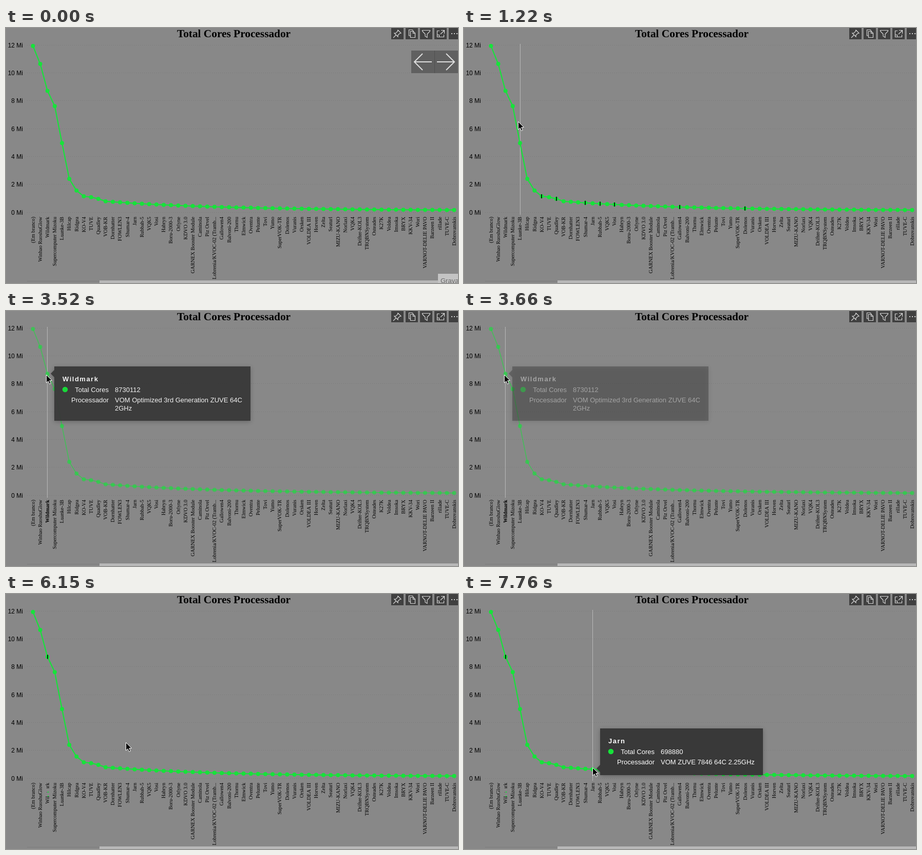
An HTML page with a canvas for the animation above (8 s loop, 880x497 px).

```html
<!DOCTYPE html>
<html lang="pt">
<head>
<meta charset="utf-8">
<title>Total Cores Processador</title>
<style>
html, body { margin: 0; width: 100%; height: 100%; overflow: hidden; background: #888; }
canvas { display: block; }
</style>
</head>
<body>
<canvas id="stage" width="880" height="497"></canvas>
<script>
const c = document.getElementById('stage').getContext('2d');
const LOOP = 8000, BG = '#888888', GREEN = '#16e33a', INK = '#06250b';
const SANS = '"Liberation Sans", Arial, sans-serif';
const SERIF = '"Liberation Serif", "Times New Roman", serif';

const names = ('(Em branco)|Winhao RuoshuGlow|Wildmark|Supercomputer Mizoku|Luanke-3B|Hilcap|Ridgea|KO-V4|TUVE|' +
  'Quadley|VOB-KR|Dornhatter|FOWLEN3|Shumar-4|Jarn|Rubbah-5|VQK5|Vosi|Habryn|Boru-2000-3|Orlyne|KDVO 3.0|' +
  'GARNEX Booster Module|Caminola|Piz Orvel|Lobrenia/KVOC-02 (Tramb...|Gallowen4|Balvoni-200|Thornu|Elmwick|' +
  'Oventra|Pelunte|Tovi|Yumo|SuperVOK-TR|Dolenos|Vuranis|Orsken|VOLDEA III|Horven|Zelta|Seaturl|MIZU-KANO|' +
  'Norlaxi|VQK4|Drifter-KOL3|TRQBNSystem|Osteades|K27K|Voldea|Imsoka|BRYX|KKV-34|Wori|VARNOT-DELIE PAVO|' +
  'Barzeen II|rillade|TUVE-C|Dobrovanskis').split('|');

// Steep start in millions of cores, then a slow exponential tail
const top10 = [11.95, 10.66, 8.73, 7.63, 4.98, 2.41, 1.57, 1.16, 1.1, 0.98];
const cores = i => i < 10 ? top10[i] : 0.14 + 0.66 * Math.exp((10 - i) / 16.5);
const px = i => 52.5 + i * 14.138;
const py = v => 359.5 - v * 27.15;
const points = names.map((_, i) => [px(i), py(cores(i))]);
const nearest = x => Math.max(0, Math.min(names.length - 1, Math.round((x - 52.5) / 14.138)));

// Pointer moves: start, end, steps, from, to, ease-out power for x and y
const moves = [
  [70, 820, 12, [890, 500], [131, 225], 2.2, 2.2],
  [820, 1630, 11, [131, 225], [78, 139], 1, 1],
  [1700, 2040, 4, [78, 134], [78, 124], 1, 1],
  [5070, 5200, 2, [79, 122], [79, 122], 1, 1],
  [5740, 6420, 11, [79, 122], [247, 333], 2.7, 1.7],
  [6560, 7100, 4, [248, 335], [250, 338], 1, 1]
];

// Progress 0..1 in n hard steps
function steps(t, a, b, n) {
  return Math.min(1, Math.floor((t - a) / (b - a) * (n - 1) + 0.1) / (n - 1));
}

const fade = (t, a, b, n) => t < a ? 0 : (steps(t, a, b, n) * (n - 1) + 1) / n;

function pointer(t) {
  const move = moves.filter(m => t >= m[0]).pop();
  if (!move) return [900, 520];
  const [a, b, n, from, to, ...power] = move;
  const left = 1 - steps(t, a, b, n);
  return to.map((v, j) => Math.round(v + (from[j] - v) * left ** power[j]));
}

function rect(x, y, w, h, fill) { c.fillStyle = fill; c.fillRect(x, y, w, h); }

function trace(pts) {
  c.beginPath();
  pts.forEach(p => c.lineTo(...p));
}

function stroke(pts, color, width) {
  trace(pts);
  c.strokeStyle = color;
  c.lineWidth = width;
  c.stroke();
}

function dot(x, y, r, fill) {
  c.beginPath();
  c.arc(x, y, r, 0, 7);
  c.fillStyle = fill;
  c.fill();
}

function text(s, x, y, font, fill, align = 'left') {
  c.font = font;
  c.fillStyle = fill;
  c.textAlign = align;
  c.fillText(s, x, y);
}

function axes(t) {
  text('Total Cores Processador', 443.5, 18, 'bold 21.33px ' + SERIF, '#000', 'center');
  c.setLineDash([1, 3]);
  for (let v = 0; v <= 12; v += 2) {
    const y = Math.round(py(v));
    stroke([[41, y - 0.5], [880, y - 0.5]], '#787878', 1);
    text(v + ' Mi', 33, y + 4, '12px ' + SANS, '#000', 'right');
  }
  c.setLineDash([]);
  names.forEach((s, i) => {
    const bold = i === 2 && t >= 2990 && t < 5400 ? 'bold ' : '';
    c.save();
    c.translate(Math.round(px(i) + 3.3), 368);
    c.rotate(-Math.PI / 2);
    text(s, 0, 0, bold + '10.15px ' + SERIF, '#000', 'right');
    c.restore();
  });
  if (t >= 5740) {
    // the unpicked label is left partly wiped
    for (const y of [379, 387]) {
      rect(76, y, 10, 7, BG);
      rect(81, y + 6, 2, 2, GREEN);
    }
  }
  rect(41, 493, 141, 1, '#7c7c7c');
  rect(182, 492, 698, 5, '#b8b8b8');
}

function series(t) {
  const dim = fade(t, 2990, 3180, 3) - fade(t, 5340, 5400, 2);
  c.globalAlpha = 1 - 0.4 * dim;
  c.lineJoin = 'round';
  stroke(points, GREEN, 2.2 - 0.6 * dim);
  points.forEach(([x, y]) => dot(x, y, 4, GREEN));
  c.globalAlpha = 1;
}

// Dark ticks that stay where the hover line has rested
function ticks(t, x) {
  const rested = t < 2990 ? [7, 9, 13, 15, 17, 26, 35] : t >= 5740 ? [2] : [];
  for (const i of rested)
    if (t >= 5740 || x < px(i) - 7) rect(Math.round(px(i)) - 1, points[i][1] - 4, 2, 8, INK);
}

const icons = [
  'M13 4l6 6-3 1-3 3v3l-7-7h3l3-3zM9 14l-5 5',
  'M9 15H6.5V3.5H13l2 2M9.5 6.5H15l3.5 3.5v8.5h-9zM14.5 6.5v4h4',
  'M4.5 4.5h15V6L14 12v6.5L10 16v-4L4.5 6z',
  'M10 5.5H5.5v12h13V13M13 4.5h6.5V11M19 5l-7 7M5.5 13.5h4V17',
  'M5 11h2m3 0h2m3 0h2'
].map(d => new Path2D(d));

function toolbar() {
  c.lineJoin = 'miter';
  c.strokeStyle = '#d6d6d6';
  icons.forEach((icon, i) => {
    c.save();
    c.translate(750 + i * 28, 0);
    rect(0, 0, 24, 22, '#404040');
    c.lineWidth = i === 4 ? 2 : 1.2;
    c.stroke(icon);
    c.restore();
  });
}

function overlay(alpha) {
  if (alpha <= 0) return;
  c.globalAlpha = alpha;
  rect(789, 44, 91, 44, '#606060');
  rect(834, 44, 1, 44, '#505050');
  for (const [tip, dir] of [[795, 1], [873, -1]]) {
    const wing = tip + 16 * dir;
    stroke([[tip, 66], [tip + 34 * dir, 66]], '#dedede', 2);
    stroke([[wing, 50], [tip, 66], [wing, 82]], '#dedede', 2);
  }
  rect(841, 479, 39, 18, '#c4c4c4');
  text('Gravar', 846, 497, '13px ' + SANS, '#6a6a6a');
  c.globalAlpha = 1;
}

function tooltip(x, y, w, h, tip, title, rows, alpha) {
  if (alpha <= 0) return;
  c.save();
  c.translate(x, y);
  c.globalAlpha = alpha;
  c.shadowColor = 'rgba(0,0,0,.25)';
  c.shadowBlur = 8;
  c.shadowOffsetY = 2;
  c.fillStyle = '#393939';
  trace([[0, 0], [w, 0], [w, h], [0, h], [0, tip + 7], [-7, tip], [0, tip - 7]]);
  c.fill();
  c.shadowColor = 'transparent';
  c.letterSpacing = '1.5px';
  text(title, 16, 29, 'bold 13px ' + SANS, '#fff');
  c.letterSpacing = '0px';
  dot(21, 45, 5.3, GREEN);
  rows.forEach(([key, value, line]) => {
    text(key, 106, line, '13px ' + SANS, '#fff', 'right');
    text(value, 118, line, '13px ' + SANS, '#fff');
  });
  c.restore();
}

const arrow = new Path2D('M0 0v15.5l3.6-3.3 2.6 5.6 2.6-1.1-2.5-5.5 4.7-.2z');

function cursor(x, y) {
  c.save();
  c.translate(x + 0.5, y + 0.5);
  c.fillStyle = '#000';
  c.fill(arrow);
  c.strokeStyle = '#fff';
  c.lineWidth = 1;
  c.stroke(arrow);
  c.restore();
}

function draw(t) {
  const [x, y] = pointer(t);
  rect(0, 0, 880, 497, BG);
  axes(t);
  const hover = y < 364 && !(t >= 5740 && t < 6350);
  if (hover) rect(Math.floor(px(nearest(x))), 31, 1, 333, '#b8b8b8');
  series(t);
  ticks(t, x);
  toolbar();
  overlay(1 - fade(t, 70, 275, 4));
  const out = t < 3450 ? 0 : steps(t, 3450, 3740, 5);
  tooltip(94, 108, 382, 106, 14, 'Wildmark', [
    ['Total Cores', '8730112', 50],
    ['Processador', 'VOM Optimized 3rd Generation ZUVE 64C', 70],
    ['', '2GHz', 86]
  ], t >= 2460 ? 1 - out ** 2 : 0);
  tooltip(265, 262, 317, 91, 78, 'Jarn', [
    ['Total Cores', '698880', 50],
    ['Processador', 'VOM ZUVE 7846 64C 2.25GHz', 70]
  ], fade(t, 7560, 7760, 4));
  cursor(x, y);
}

const start = performance.now();
function tick() {
  draw((performance.now() - start) % LOOP);
  requestAnimationFrame(tick);
}
tick();
</script>
</body>
</html>
```
